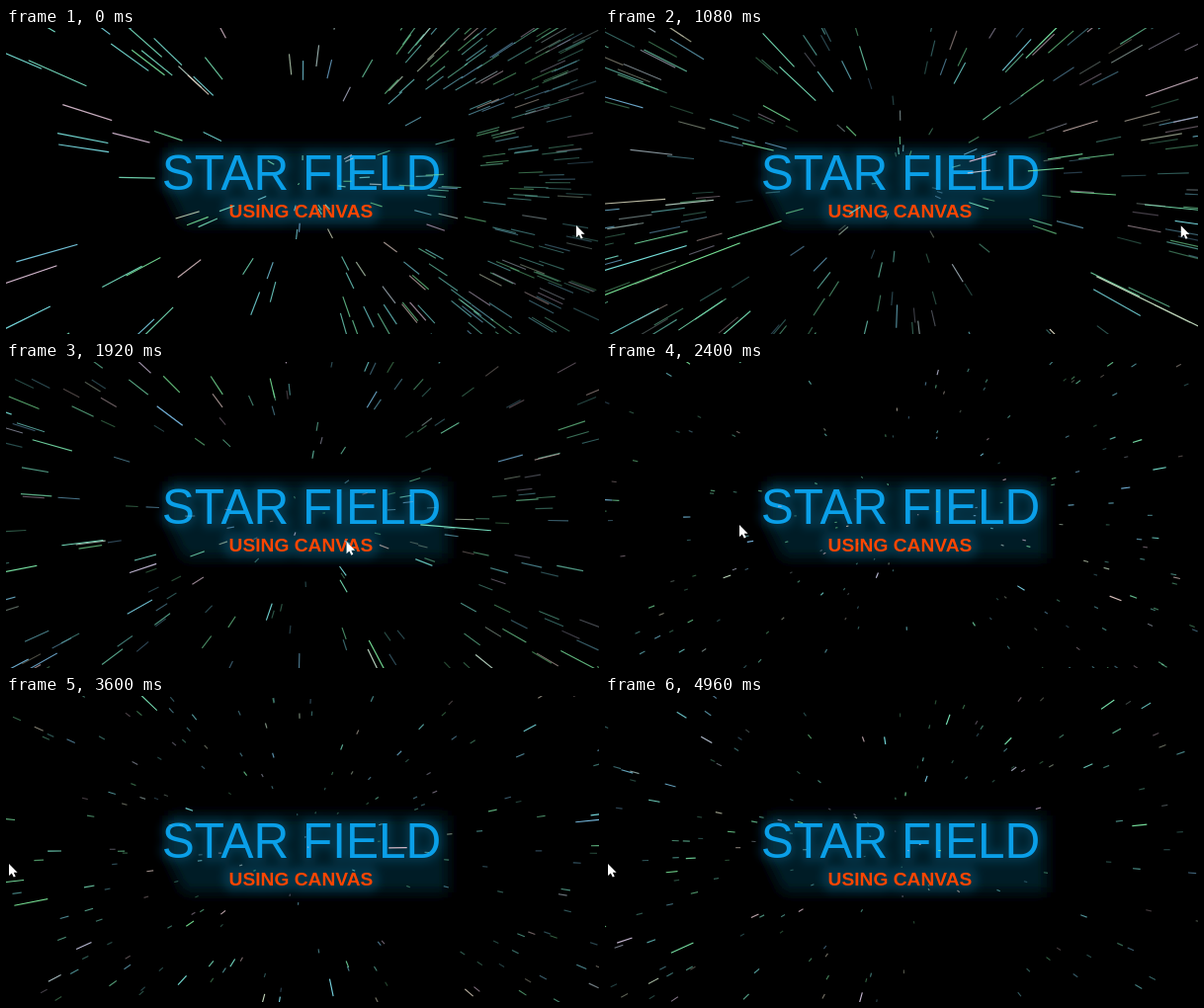
An HTML page with a canvas for the animation above (5000 ms loop, 600 by 310 pixels).

```html
<!DOCTYPE html>
<html lang="en">
<head>
<meta charset="utf-8">
<title>Star Field</title>
<style>
  html, body { margin: 0; width: 100%; height: 100%; overflow: hidden; background: #000; }
  svg, canvas { position: absolute; left: 0; top: 0; width: 600px; height: 310px; }
  text { font-family: "Liberation Sans", Arial, sans-serif; }
  .title { font-size: 49.5px; }
  .sub { font-size: 19.2px; font-weight: bold; }
  .glow text { fill: #0a6d98; stroke: #0a6d98; stroke-linejoin: round; }
</style>
</head>
<body>
<svg width="600" height="310" viewBox="0 0 600 310">
  <defs>
    <filter id="wide" x="-20%" y="-40%" width="140%" height="180%"><feGaussianBlur stdDeviation="7"/></filter>
    <filter id="near" x="-20%" y="-60%" width="140%" height="220%"><feGaussianBlur stdDeviation="5"/></filter>
  </defs>
  <path d="M164 121H447V199H180L164 166Z" fill="#041a26" filter="url(#wide)"/>
  <g class="glow" filter="url(#near)" opacity=".3" aria-hidden="true">
    <text class="title" x="157.8" y="164" stroke-width="9">STAR FIELD</text>
    <text class="sub" x="225.6" y="192" stroke-width="14">USING CANVAS</text>
  </g>
  <text class="title" x="157.8" y="164" fill="#0a9fe8">STAR FIELD</text>
  <text class="sub" x="225.6" y="192" fill="#ff4500">USING CANVAS</text>
</svg>
<canvas id="sky" width="600" height="310"></canvas>
<script>
const W = 600, H = 310, LOOP = 5000, STEP = 40, STARS = 500;
const ctx = document.getElementById('sky').getContext('2d');
const arrow = new Path2D('M0 0V12L2.8 9.4L4.8 13.6L6.7 12.7L4.8 8.7H8.6Z');

// rows: time, values...
const speedKeys = [[0, .09], [640, .1], [1560, .11], [1800, .08], [2300, .012],
  [2500, .012], [3080, .022], [4080, .02], [5000, .018]];
const mouseKeys = [[0, 577, 200], [640, 593, 201], [1200, 580, 200], [1560, 501, 195],
  [2400, 136, 165], [2900, 1, 170], [3080, 1, 170], [3500, 3, 170], [5000, 3, 170]];

function keyed(keys, t, col) {
  let i = 1;
  while (i < keys.length - 1 && t > keys[i][0]) i++;
  const a = keys[i - 1], b = keys[i];
  return a[col] + (b[col] - a[col]) * (t - a[0]) / (b[0] - a[0]);
}

function random(seed) {
  let s = Math.imul(seed + 1, 0x9e3779b1) | 0;
  return () => {
    s = (s + 0x6d2b79f5) | 0;
    let t = Math.imul(s ^ (s >>> 15), 1 | s);
    t = (t + Math.imul(t ^ (t >>> 7), 61 | t)) ^ t;
    return ((t ^ (t >>> 14)) >>> 0) / 4294967296;
  };
}

// distance flown at the start of each step
const flown = [0];
for (let t = STEP; t < LOOP; t += STEP) flown.push(flown[flown.length - 1] + keyed(speedKeys, t, 1));

function drawStar(i, dist, speed) {
  const depth = random(i)() - dist;
  const lap = -Math.floor(depth);
  const z = Math.max(.004, depth + lap);
  const rnd = random(i + lap * 1009);
  const x = (rnd() - .5) * W, y = (rnd() - .5) * H;
  const back = z + speed;
  const x0 = W / 2 + x / back, y0 = H / 2 + y / back;
  if (x0 < 0 || x0 > W || y0 < 0 || y0 > H) return;
  const pale = rnd() < .25;
  const hue = pale ? rnd() * 360 : 135 + rnd() * 70;
  ctx.globalAlpha = Math.min(1, 1.3 - z);
  ctx.strokeStyle = `hsl(${hue} ${pale ? 25 : 60}% ${pale ? 78 : 66}%)`;
  ctx.beginPath();
  ctx.moveTo(x0, y0);
  ctx.lineTo(W / 2 + x / z, H / 2 + y / z);
  ctx.stroke();
}

function drawMouse(t) {
  ctx.save();
  ctx.globalAlpha = 1;
  ctx.translate(keyed(mouseKeys, t, 1), keyed(mouseKeys, t, 2));
  ctx.fillStyle = '#fff';
  ctx.fill(arrow);
  ctx.restore();
}

function draw(time) {
  const n = Math.floor((time % LOOP) / STEP), t = n * STEP;
  const speed = keyed(speedKeys, t, 1);
  ctx.clearRect(0, 0, W, H);
  ctx.lineWidth = 1.15;
  ctx.lineCap = 'square';
  for (let i = 0; i < STARS; i++) drawStar(i, flown[n], speed);
  drawMouse(t);
}

const start = performance.now();
function tick() {
  draw(performance.now() - start);
  requestAnimationFrame(tick);
}
tick();
</script>
</body>
</html>
```
